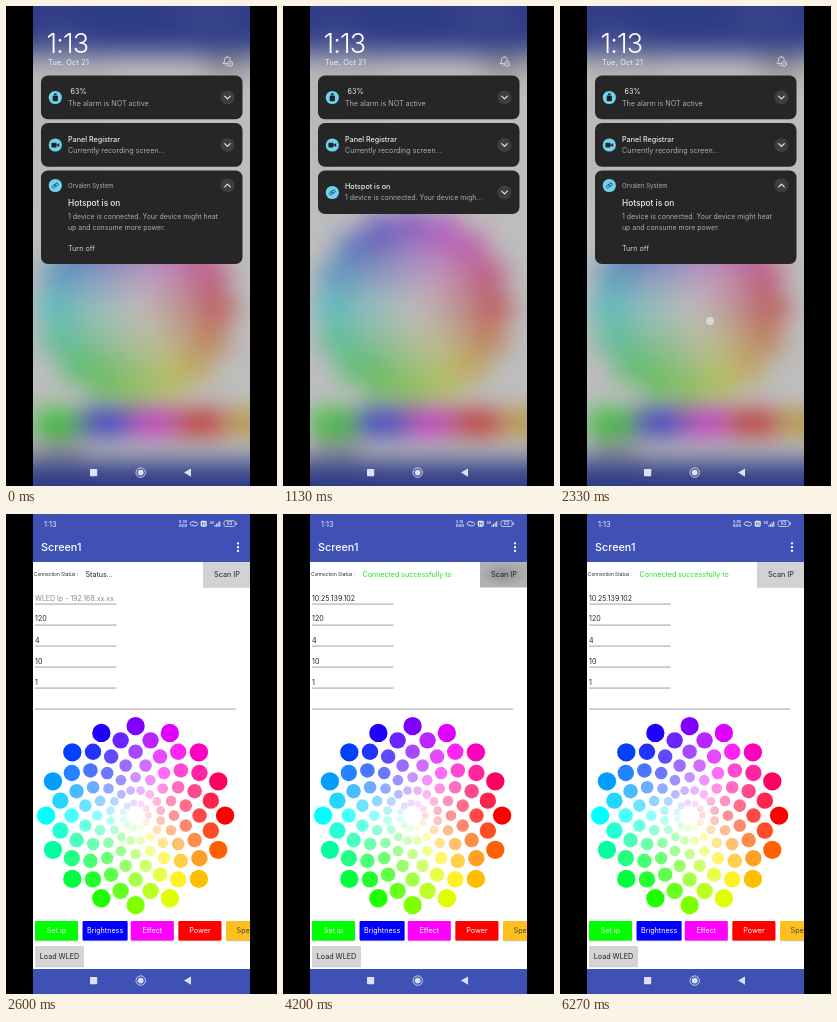
An HTML page for the animation above (6470 ms loop, 271 px wide and 480 px high).

```html
<!DOCTYPE html>
<html lang="en">
<head>
<meta charset="utf-8">
<title>Phone screen</title>
<style>
html, body { margin: 0; width: 100%; height: 100%; overflow: hidden; background: #000; }
svg { position: fixed; inset: 0; width: 100%; height: 100%; display: block; }
text { font-family: Inter, Roboto, sans-serif; white-space: pre; }
</style>
</head>
<body>
<svg viewBox="0 0 271 480" xmlns="http://www.w3.org/2000/svg">
  <defs>
    <clipPath id="phone"><rect x="27" width="217" height="480"/></clipPath>
    <clipPath id="cardClip"><rect id="cardClipBox" x="35" y="164.5" width="201.5" rx="7"/></clipPath>
    <filter id="soft" filterUnits="userSpaceOnUse" x="-20" y="-60" width="320" height="600" color-interpolation-filters="sRGB">
      <feGaussianBlur id="blur" stdDeviation="13"/>
    </filter>
    <radialGradient id="press">
      <stop offset="0" stop-color="#000" stop-opacity=".3"/>
      <stop offset="1" stop-color="#000" stop-opacity=".16"/>
    </radialGradient>
  </defs>
  <rect width="271" height="480" fill="#000"/>
  <g clip-path="url(#phone)">
    <g id="app"></g>
    <rect id="dim" x="27" width="217" height="480" fill="#000"/>
    <g id="nav"></g>
    <g id="shade"></g>
    <circle id="touch" r="4.5" fill="#dcdcdc" stroke="#a9a9a9" stroke-width=".7"/>
  </g>
</svg>
<script>
const LOOP = 6470;
const $ = id => document.getElementById(id);
const set = (id, attrs) => {
  for (const k in attrs) $(id).setAttribute(k, attrs[k]);
};
const clamp = v => Math.max(0, Math.min(1, v));
const ramp = (t, a, b) => clamp((t - a) / (b - a));
const easeOut = v => 1 - (1 - v) ** 3;
const mix = (a, b, v) => a + (b - a) * v;

const label = (x, y, size, fill, str, extra = '') =>
  `<text x="${x}" y="${y}" font-size="${size}" fill="${fill}" ${extra}>${str}</text>`;
const box = (x, y, w, h, fill, extra = '') =>
  `<rect x="${x}" y="${y}" width="${w}" height="${h}" fill="${fill}" ${extra}/>`;
const disc = (x, y, r, fill, extra = '') =>
  `<circle cx="${x}" cy="${y}" r="${r}" fill="${fill}" ${extra}/>`;
const line = (d, stroke, width, extra = '') =>
  `<path d="${d}" fill="none" stroke="${stroke}" stroke-width="${width}" stroke-linecap="round" stroke-linejoin="round" ${extra}/>`;

function hsv(h, s) {
  const part = n => {
    const k = (n + h / 60) % 6;
    return Math.round(255 * (1 - s * Math.max(0, Math.min(k, 4 - k, 1))));
  };
  return `rgb(${part(5)},${part(3)},${part(1)})`;
}

// Flower layout: dots grow outwards, every other ring is turned by half a step.
function wheel(cx, cy, maxR) {
  const rings = 8, base = maxR / (rings - 1) / 2;
  let out = '';
  for (let i = 1; i < rings; i++) {
    const sat = i / (rings - 1), r = maxR * sat;
    const size = base * (1 + 1.2 * (i - rings / 2) / rings);
    const fit = Math.floor(0.975 * Math.PI / Math.asin(size / r) + 0.5);
    const total = Math.min(fit, rings * 2);
    for (let j = 0; j < total; j++) {
      const a = (2 * j + (i + 1) % 2) * Math.PI / total;
      out += disc((cx + r * Math.cos(a)).toFixed(2), (cy + r * Math.sin(a)).toFixed(2),
        (size - 0.1).toFixed(2), hsv(a * 180 / Math.PI, sat));
    }
  }
  return out;
}

function button(x, y, w, h, fill, ink, str) {
  return box(x, y + 0.8, w, h, '#000', 'rx="1" opacity=".22"') + box(x, y, w, h, fill, 'rx="1"') +
    label(x + w / 2, y + h / 2 + 2.7, 7.2, ink, str, 'text-anchor="middle"');
}

function statusBar() {
  const ink = '#eef0ff';
  return label(38, 12.5, 7.3, ink, '1:13') +
    label(173, 9.3, 3.7, ink, '0.30', 'id="speed" font-weight="600"') +
    label(173, 12.8, 3.5, ink, 'KB/S', 'font-weight="600"') +
    line('M187 11.2 l-1.4 .4 a1.8 1.8 0 0 1 -.6 -3.3 l2 -.8 a1.7 1.7 0 0 1 1.9 1 M189 8.4 l1.3 -.2 a1.8 1.8 0 0 1 .5 3.2 l-2 .8 a1.7 1.7 0 0 1 -1.9 -1', ink, 0.8) +
    box(194.7, 6.7, 6, 6, ink, 'rx="1.4"') + line('M196.4 11.3 v-3.2 l2.6 3.2 v-3.2', '#3f51b5', 0.7) +
    label(203.5, 9.5, 3.4, ink, '4G', 'font-weight="600"') +
    [0, 1, 2, 3].map(i => box(208.5 + i * 1.6, 11 - i * 1.2, 1, 1.8 + i * 1.2, ink)).join('') +
    box(218, 6.7, 11.2, 5.8, 'none', `rx="1.8" stroke="${ink}" stroke-width=".7"`) +
    box(229.8, 8.5, 1, 2.2, ink) +
    label(223.6, 11.3, 4.2, ink, '63', 'text-anchor="middle" font-weight="600"');
}

function buildApp() {
  const ink = '#222';
  let s = box(-20, -60, 320, 600, '#fff') + box(-20, -60, 320, 108, '#3f51b5') +
    box(-20, 455, 320, 85, '#3f51b5') + statusBar() +
    label(35, 37.2, 10.8, '#fff', 'Screen1', 'font-weight="500"');
  for (const y of [29.4, 33.2, 37]) s += disc(232, y, 1.15, '#fff');
  s += label(28, 62.3, 4.75, ink, 'Connection Status :') +
    label(79.5, 63.2, 7.1, ink, 'Status...', 'id="status"');
  s += box(197, 49, 47, 25, '#000', 'opacity=".15"') + box(197, 48, 47, 25, '#d2d2d2') +
    box(197, 48, 47, 25, 'url(#press)', 'id="pressed"') +
    label(221, 63.3, 7.3, ink, 'Scan IP', 'text-anchor="middle"');
  s += label(29, 86.6, 7, '#888', '', 'id="address"');
  ['120', '4', '10', '1'].forEach((v, i) => { s += label(29, 107.4 + i * 21.1, 7.1, ink, v); });
  for (let i = 0; i < 6; i++) s += box(29, 89.7 + i * 21, i < 5 ? 81.5 : 201, 0.7, '#777');
  s += wheel(129.6, 301.6, 89.5);
  const row = [['Set ip', '#0f0', '#e8ffe8'], ['Brightness', '#00f', '#fff'], ['Effect', '#f0f', '#fff'],
    ['Power', '#f00', '#fff'], ['Speed', '#ffc01e', '#444']];
  row.forEach(([name, fill, color], i) => {
    s += button(29 + i * 47.6 + (i > 1 ? 0.6 : 0), 407, i === 1 ? 45 : 43, 19.5, fill, color, name);
  });
  return s + button(29, 432, 49, 20.5, '#d4d4d4', ink, 'Load WLED');
}

function buildNav() {
  const ink = '#dde1f6';
  return box(84, 463, 7.2, 7.2, ink, 'rx=".6"') + disc(134.7, 466.6, 2.9, ink) +
    disc(134.7, 466.6, 4.7, 'none', `stroke="${ink}" stroke-width=".9"`) +
    `<path d="M178 466.6 L185 462.4 V470.8 Z" fill="${ink}"/>`;
}

const chevron = (y, dir) => disc(221.5, y, 7, '#3e3e3e') +
  line(`M218.7 ${y - 1.4 * dir} L221.5 ${y + 1.4 * dir} L224.3 ${y - 1.4 * dir}`, '#ededed', 1.1);
const badge = y => disc(49.3, y, 6.6, '#6fd3f0');
const linkGlyph = `<g transform="translate(49.3 0) rotate(-35)" fill="none" stroke="#28505e" stroke-width=".9">
  <rect x="-3.3" y="-1.3" width="3.8" height="2.6" rx="1.3"/><rect x="-.5" y="-1.3" width="3.8" height="2.6" rx="1.3"/></g>`;

function buildShade() {
  const card = '#262626', bright = '#ececec', dull = '#adadad';
  const bell = line('M217.2 57.6 h4 M217.2 57.6 l1.2 -1.6 v-2.2 a2.9 2.9 0 0 1 5.8 0 v.6 M219.8 59.4 h1.2 M221.3 50.8 v-.7', '#e3e5ee', 0.8) +
    disc(224.2, 57.8, 2.5, 'none', 'stroke="#e3e5ee" stroke-width=".8"') + line('M223.2 57.8 h2', '#e3e5ee', 0.7);
  const head = label(40.5, 47.3, 27, '#fff', '1:13', 'font-weight="300" letter-spacing="-.9"') +
    label(42, 59.3, 7.3, '#eef0f4', 'Tue, Oct 21', 'letter-spacing=".25"') + bell;
  const first = box(35, 69.5, 201.5, 43.8, card, 'rx="7"') + badge(91.5) +
    box(46.7, 89.6, 5.2, 5.6, '#222', 'rx="1"') + box(48, 87.4, 2.6, 1.6, '#222') +
    label(64.5, 88, 7.2, bright, '63%') + label(62, 99.6, 7.15, dull, 'The alarm is NOT active') + chevron(91.5, 1);
  const second = box(35, 117, 201.5, 43.8, card, 'rx="7"') + badge(139) +
    box(45.4, 136.7, 5.2, 4.8, '#222', 'rx="1"') + '<path d="M50.8 138.7 l2.4 -1.6 v4 l-2.4 -1.6 z" fill="#222"/>' +
    label(62, 135.5, 7.2, bright, 'Panel Registrar', 'font-weight="500"') +
    label(62, 147, 7.15, dull, 'Currently recording screen…') + chevron(139, 1);
  const small = label(62, 183, 7.2, bright, 'Hotspot is on', 'font-weight="500"') +
    label(62, 194.3, 6.95, dull, '1 device is connected. Your device migh…') + chevron(186.5, 1);
  const large = label(62, 181.6, 6.1, dull, 'Orvalen System') +
    label(62, 200, 8.3, bright, 'Hotspot is on', 'font-weight="500"') +
    label(62, 213.4, 6.95, dull, '1 device is connected. Your device might heat') +
    label(62, 223.8, 6.95, dull, 'up and consume more power.') +
    label(62, 244.6, 7.2, '#c3cfe6', 'Turn off') + chevron(179.5, -1);
  return head + first + second + box(35, 164.5, 201.5, 93, card, 'rx="7" id="card"') +
    `<g clip-path="url(#cardClip)"><g id="small">${small}</g><g id="large">${large}</g>
    <g id="link">${badge(0).replace('cy="0"', 'cy="0"')}${linkGlyph}</g></g>`;
}

function render(t) {
  // Hotspot card: folds, then unfolds
  const open = t < 1000 ? 1 - easeOut(ramp(t, 70, 430)) : easeOut(ramp(t, 1330, 1720));
  const height = mix(43.6, 93.5, open);
  set('card', { height });
  set('cardClipBox', { height });
  set('small', { opacity: clamp(1 - open * 2.2) });
  set('large', { opacity: clamp(open * 2 - 0.9) });
  set('link', { transform: `translate(0 ${mix(186.5, 179.5, open)})` });

  // Swipe up uncovers the app
  const gone = ramp(t, 2340, 2580);
  const shown = 1 - gone;
  set('shade', { opacity: clamp(1 - gone * 1.3), transform: `translate(0 ${-70 * gone * gone})` });
  set('dim', { opacity: 0.26 * shown });
  set('blur', { stdDeviation: 13 * shown });
  if (shown > 0) set('app', { filter: 'url(#soft)' });
  else $('app').removeAttribute('filter');
  set('touch', {
    cx: 150, cy: 315 - 150 * gone * gone,
    opacity: t >= 2325 ? 0.9 * (1 - ramp(t, 2480, 2560)) : 0
  });

  // Scan and connect
  const linked = t >= 3670;
  $('status').textContent = linked ? 'Connected successfully to' : 'Status...';
  set('status', { fill: linked ? '#1fe01f' : '#222' });
  $('address').textContent = linked ? '10.25.139.102' : 'WLED Ip - 192.168.xx.xx';
  set('address', { fill: linked ? '#222' : '#888' });
  set('pressed', { opacity: ramp(t, 3330, 3600) * (1 - ramp(t, 4330, 4870)) });
  $('speed').textContent = t < 3000 ? '0.30' : t < 5000 ? '2.10' : '0.80';
}

$('app').innerHTML = buildApp();
$('nav').innerHTML = buildNav();
$('shade').innerHTML = buildShade();
const start = performance.now();
function tick() {
  render((performance.now() - start) % LOOP);
  requestAnimationFrame(tick);
}
render(0);
requestAnimationFrame(tick);
</script>
</body>
</html>
```
